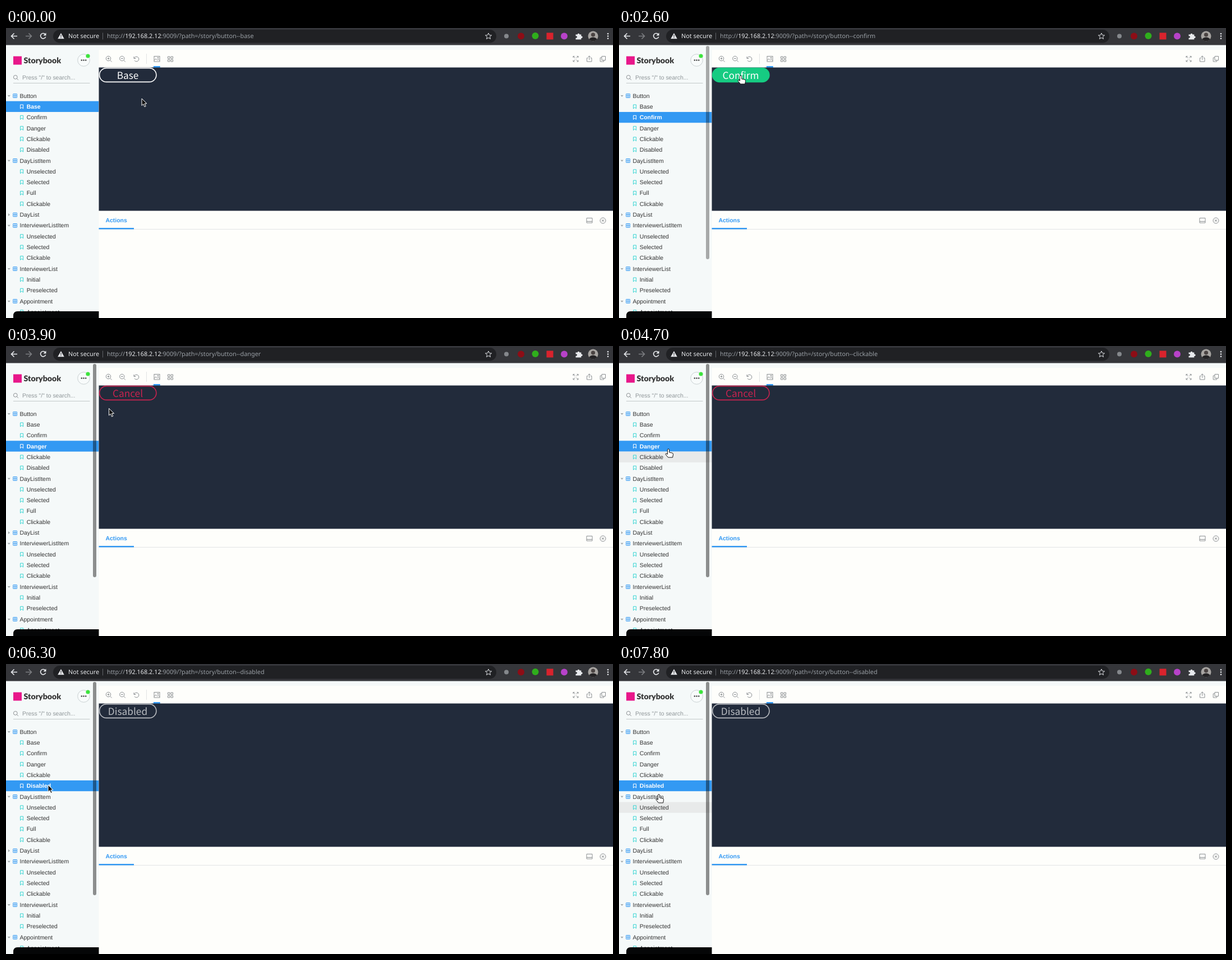
Recreate the animation shown at these times as an HTML page. Size 1082x518 px, loop 8 s.

```html
<!DOCTYPE html>
<html lang="en">
<head>
<meta charset="utf-8">
<title>Button stories</title>
<style>
  html, body { margin: 0; width: 100%; height: 100%; overflow: hidden; background: #f5f9f9; }
  svg { display: block; width: 100vw; height: 100vh; }
  text { font: 10.45px "Liberation Sans", Arial, sans-serif; fill: #333; text-rendering: geometricPrecision; white-space: pre; }
  .chrome text { font: 10.83px "Noto Sans", sans-serif; fill: #9aa0a6; }
  .chrome .bright { fill: #e8eaed; }
  .line { fill: none; stroke: #8b8f92; stroke-width: 1; }
  .nav { fill: none; stroke: #e8eaed; stroke-width: 1.6; }
  .button { font: 17.3px "Noto Sans CJK JP", "Noto Sans", sans-serif; }
</style>
</head>
<body>
<svg viewBox="0 0 1082 518" xmlns="http://www.w3.org/2000/svg">
  <rect width="1082" height="518" fill="#f5f9f9"/>

  <g class="chrome">
    <rect width="1082" height="30.5" fill="#35363a"/>
    <rect x="84" y="3" width="790" height="23.5" rx="11.7" fill="#202124"/>
    <path class="nav" d="M20 14.5H9.5M14.5 9.5l-5 5 5 5"/>
    <path class="nav" d="M35 14.5h10.500M40.500 9.500l5 5-5 5" stroke-opacity=".4"/>
    <path class="nav" d="M70 11.300a4.700 4.700 0 1 0 .7 4.500"/>
    <path d="M71.500 8.500v5h-5z" fill="#e8eaed"/>
    <path d="M98 9l5.800 10.200H92.200z" fill="#e8eaed"/>
    <path d="M98 12.600v3M98 16.600v1.200" stroke="#202124" stroke-width="1.200"/>
    <text class="bright" x="111" y="18">Not secure</text>
    <path d="M172.500 8.500v12" stroke="#5f6368"/>
    <text x="180" y="18">http://<tspan class="bright">192.168.2.12</tspan>:9009/?path=/story/button--<tspan id="slug"></tspan></text>
    <path d="M860 9l1.600 3.700 4 .3-3.100 2.600 1 4-3.500-2.200-3.500 2.200 1-4-3.100-2.600 4-.3z" fill="none" stroke="#dfe1e5"/>
    <circle cx="892" cy="14.500" r="4" fill="#85888c"/>
    <circle cx="918" cy="14.500" r="6" fill="#8d0d16"/>
    <circle cx="943.500" cy="14" r="6" fill="#2fae1c"/>
    <rect x="963.500" y="8.500" width="12" height="12" fill="#d9232d"/>
    <circle cx="995" cy="14.500" r="6" fill="#b742c9"/>
    <path d="M1015.500 11.500h3.200a1.800 1.800 0 1 1 3.600 0h3v3a1.800 1.800 0 1 1 0 3.400v2.600h-9.800v-3a1.700 1.700 0 1 0 0-3z" fill="#e8eaed"/>
    <circle cx="1046.500" cy="14.500" r="9" fill="#a8a5a2"/>
    <path d="M1039.500 20a8 7 0 0 1 14 0 9 9 0 0 1-14 0z" fill="#242325"/>
    <circle cx="1046.500" cy="12" r="3.600" fill="#4b4443"/>
    <g fill="#e8eaed"><circle cx="1073" cy="10.200" r="1.300"/><circle cx="1073" cy="14.500" r="1.300"/><circle cx="1073" cy="18.800" r="1.300"/></g>
  </g>

  <rect x="13" y="50.500" width="15" height="15" fill="#e8178a"/>
  <text x="31.500" y="63" style="font:900 14.200px Lato,sans-serif">Storybook</text>
  <circle cx="138.500" cy="57.500" r="10.800" fill="#f8fbfb" stroke="#c9d0d2"/>
  <g fill="#444"><circle cx="134.800" cy="57.500" r="1.300"/><circle cx="138.500" cy="57.500" r="1.300"/><circle cx="142.200" cy="57.500" r="1.300"/></g>
  <circle cx="146" cy="50" r="3.600" fill="#3de33d"/>
  <g class="line"><circle cx="16.800" cy="87.800" r="3.400"/><path d="M19.300 90.300l2.600 2.600"/></g>
  <text x="29" y="91.700" style="fill:#8f9699">Press "/" to search...</text>
  <path d="M13 98.500h136.500" stroke="#c3c9ca"/>
  <g id="tree"></g>
  <rect id="scrollbar" x="155" y="32" width="6" height="381" rx="3"/>
  <path d="M13 518v-4q0-8 8-8h165.500q8 0 8 8v4z" fill="#050607"/>

  <rect x="165.500" y="39" width="917" height="479" fill="#fefefb"/>
  <g class="line" id="zoom"></g>
  <path d="M250.500 46v18" stroke="#e2e4e4"/>
  <rect x="262.800" y="68" width="12" height="3" fill="#3399f3"/>
  <g class="line">
    <rect x="264" y="50.500" width="10" height="9.500"/>
    <path d="M264 58l3-3 2.500 2.500 2-1.500 2.500 2.500"/><circle cx="271" cy="53.300" r="1"/>
    <path d="M288.500 51h3.500v3.500h-3.500zM294 51h3.500v3.500h-3.500zM288.500 56.500h3.500v3.500h-3.500zM294 56.500h3.500v3.500h-3.500z"/>
    <path d="M1011 53v-2.500h2.500M1017.500 50.500h2.500v2.500M1020 57.500v2.500h-2.500M1013.500 60h-2.500v-2.500M1011 50.500l3.500 3.500M1020 50.500l-3.500 3.500M1011 60l3.500-3.500M1020 60l-3.500-3.500"/>
    <path d="M1037.500 53.500h-2v6.500h8.500v-6.500h-2M1039.700 57v-7M1037.500 52l2.200-2.200 2.200 2.200"/>
    <path d="M1062 50.500h6.500v7h-6.500zM1062 53h-2.800v7h6.500v-2.500"/>
    <path d="M1035 339.500h10v8.500h-10zM1035 345.500h10"/>
    <circle cx="1064" cy="344" r="5"/><path d="M1062 342l4 4M1066 342l-4 4"/>
  </g>
  <rect x="165.500" y="70.500" width="917" height="256" fill="#222b3b"/>
  <path d="M165.500 359.500h917" stroke="#e3e5e5"/>
  <text x="177.500" y="347" style="font-weight:700;fill:#3399f3">Actions</text>
  <rect x="165.500" y="357" width="62.500" height="2.500" fill="#3399f3"/>

  <g id="button">
    <rect x="166.600" y="71.600" width="101.300" height="24.800" rx="12.400" stroke-width="1.600"/>
    <text class="button" x="217" y="91" text-anchor="middle"></text>
  </g>
  <path id="cursor"/>
</svg>
<script>
const $ = id => document.getElementById(id);
const LOOP = 8000, TICK = 100, ROW = 19.31;

const groups = {
  Button: 'Base Confirm Danger Clickable Disabled',
  DayListItem: 'Unselected Selected Full Clickable',
  DayList: '',
  InterviewerListItem: 'Unselected Selected Clickable',
  InterviewerList: 'Initial Preselected',
  Appointment: 'Appointment'
};

const looks = {
  base: { label: 'Base', color: '#fff', hoverText: '#1d1d1d' },
  confirm: { label: 'Confirm', color: '#16cb82', hoverText: '#fff' },
  danger: { label: 'Cancel', color: '#c9234f', hoverText: '#fff' },
  clickable: { label: 'Clickable', color: '#fff', hoverText: '#1d1d1d' },
  disabled: { label: 'Disabled', color: '#b9bcc1' }
};

// time, address, selected row, button shown, hovered row
const scenes = [
  [0, 'base', 1, 'base', -1],
  [1600, 'base', 1, 'base', 2],
  [2100, 'confirm', 2, 'base', -1],
  [2200, 'confirm', 2, 'confirm', -1],
  [3200, 'confirm', 2, 'confirm', 3],
  [3300, 'danger', 3, 'confirm', 2],
  [3400, 'danger', 3, 'danger', -1],
  [4200, 'danger', 3, 'danger', 4],
  [4700, 'clickable', 3, 'danger', 4],
  [4800, 'clickable', 4, 'clickable', -1],
  [5800, 'clickable', 4, 'clickable', 5],
  [6300, 'disabled', 5, 'disabled', -1],
  [7800, 'disabled', 5, 'disabled', 7]
];

// first step, last step, x, y
const moves = [
  [0, 0, 242, 126], [200, 200, 243, 127], [500, 800, 78, 145],
  [900, 1300, 218, 85], [1400, 1800, 98, 161], [2200, 2600, 217, 85],
  [2900, 3300, 95, 170], [3400, 3700, 217, 86], [3800, 4300, 88, 184],
  [4800, 5200, 218, 85], [5400, 5900, 75, 216], [6500, 7000, 240, 88],
  [7300, 7500, 78, 215], [7700, 7800, 71, 233]
];

// time, scrollbar opacity
const fades = [[0, 0], [600, .43], [2500, .32], [2900, .43], [5300, .32], [5600, .43], [6900, .32], [7300, .43]];

const ARROW = 'M0 0V12.5L2.9 9.8 5 14.8 7.2 13.8 5.1 9H9z';
const HAND = 'M-1.600 1.500a1.600 1.600 0 0 1 3.200 0V6l5 1q2 .5 2 2.500l-1 5.500H-.5L-5 9.500q0-2 2-1.200l1.400 1.200z';

const rows = Object.entries(groups).flatMap(([name, list]) =>
  [{ name, group: true, open: list !== '' },
   ...list.split(' ').filter(Boolean).map(name => ({ name }))]);

$('tree').innerHTML = rows.map(({ name, group, open }, i) => {
  const y = 121 + i * ROW;
  const icon = group
    ? `<path d="${open ? `M2.800 ${y - 1}h5l-2.500 3z` : `M4 ${y - 2.500}v5l3-2.500z`}" fill="#a3a9ab"/>
       <path d="M12.800 ${y - 3.200}h6.600v6.600h-6.600zM16.100 ${y - 3.200}v6.600M12.800 ${y + .1}h6.600" fill="none" stroke="#3399f3"/>`
    : `<path class="mark" d="M25.600 ${y - 3.300}h5v7l-2.500-2.400-2.500 2.400z" fill="none"/>`;
  return `<g><rect y="${y - ROW / 2}" width="165.500" height="${ROW}"/>${icon}
    <text x="${group ? 24.5 : 36.7}" y="${y + 3.700}">${name}</text></g>`;
}).join('');

$('zoom').innerHTML = [183, 207.3].map((x, i) =>
  `<circle cx="${x - .5}" cy="54.500" r="4.200"/><path d="M${x + 2.500} 57.500l3 3M${x - 2.500} 54.500h4${i ? '' : 'm-2-2v4'}"/>`
).join('') + '<path d="M228 51v3.500h3.500M228.500 54a4.300 4.300 0 1 1 .5 4"/>';

const at = (table, t) => table.findLast(row => row[0] <= t);

function pointer(t) {
  const i = moves.findLastIndex(move => move[0] <= t);
  const [start, end, x, y] = moves[i];
  const from = moves[Math.max(i - 1, 0)];
  const u = Math.min(1, (t - start + TICK) / (end - start + TICK));
  const ease = u * u * (3 - 2 * u);
  return [from[2] + (x - from[2]) * ease, from[3] + (y - from[3]) * ease];
}

function draw(t) {
  const [, slug, selected, story, hovered] = at(scenes, t);
  const [x, y] = pointer(t);
  const look = looks[story];
  const overButton = look.hoverText && x > 166 && x < 268 && y > 71 && y < 97;
  const justDisabled = t >= 6300 && t < 7300;
  const hand = overButton || x < 165 && !justDisabled;

  $('slug').textContent = slug;
  [...$('tree').children].forEach((row, i) => {
    const on = i === selected;
    row.firstChild.setAttribute('fill', on ? '#3399f3' : i === hovered ? '#e8eaea' : 'none');
    row.querySelector('.mark')?.setAttribute('stroke', on ? '#fff' : '#37d5d3');
    const label = row.querySelector('text');
    label.style.fill = on ? '#fff' : '';
    label.style.fontWeight = on ? 700 : 400;
  });
  $('scrollbar').setAttribute('opacity', at(fades, t)[1]);

  const [shape, label] = $('button').children;
  shape.setAttribute('stroke', look.color);
  shape.setAttribute('fill', overButton ? look.color : 'none');
  label.textContent = look.label;
  label.style.fill = overButton ? look.hoverText : look.color;

  const cursor = $('cursor');
  cursor.setAttribute('d', hand ? HAND : ARROW);
  cursor.setAttribute('fill', hand ? '#fff' : '#111');
  cursor.setAttribute('stroke', hand ? '#111' : '#fff');
  cursor.setAttribute('transform', `translate(${x} ${y})`);
}

const begin = performance.now();
let shown = -1;
function frame() {
  const t = Math.floor((performance.now() - begin) % LOOP / TICK) * TICK;
  if (t !== shown) draw(shown = t);
  requestAnimationFrame(frame);
}
frame();
</script>
</body>
</html>
```
